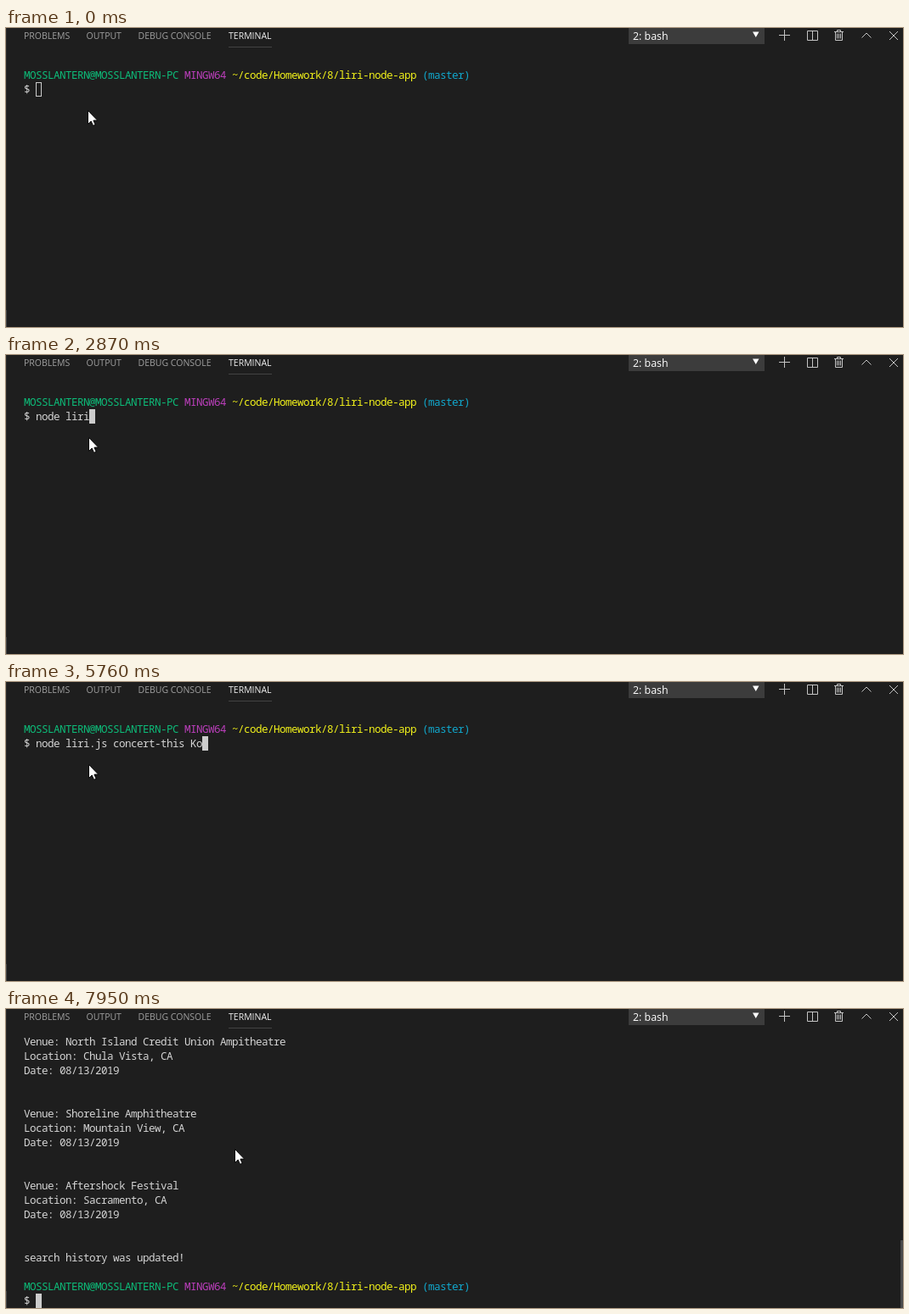
An HTML page for the animation above (8000 ms loop, 1056 px wide and 353 px high).

```html
<!DOCTYPE html>
<html lang="en">
<head>
<meta charset="utf-8">
<title>Terminal</title>
<style>
  html, body { margin: 0; width: 100%; height: 100%; overflow: hidden; background: #1e1e1e; }
  svg { position: absolute; left: 0; top: 0; display: block; }
  .ui { font-family: "Open Sans", "Noto Sans", sans-serif; }
  .tab { font-size: 10.5px; fill: #a0a0a0; }
  .active { fill: #f0f0f0; }
  #shell { font-size: 12.4px; fill: #fff; }
  .icons { fill: none; stroke: #c5c5c5; }
  pre {
    position: absolute; left: 21px; top: 30px; margin: 0;
    font: 500 12.6px/17px "Noto Sans Mono", monospace; color: #d4d4d4;
  }
  .host { color: #0dbc79; }
  .system { color: #bc3fbc; }
  .path { color: #f2f21a; }
  .branch { color: #11a8cd; }
</style>
</head>
<body>
<svg width="1056" height="353" viewBox="0 0 1056 353">
  <path d="M0 0h1v333h-1z" fill="#2a2a2a"/>
  <path d="M0 333h1v20h-1z" fill="#484848"/>
  <g class="ui tab">
    <text x="21" y="13">PROBLEMS</text>
    <text x="94.5" y="13">OUTPUT</text>
    <text x="155.5" y="13">DEBUG CONSOLE</text>
    <text x="262" y="13" class="active">TERMINAL</text>
  </g>
  <path d="M262 22h51v1h-51z" fill="#434343"/>
  <path d="M733 0h160v19h-160z" fill="#3c3c3c"/>
  <text id="shell" class="ui" x="738" y="14">2: bash</text>
  <path d="M879 4.5h7.5l-3.75 6.5z" fill="#fff"/>
  <g class="icons">
    <path d="M910 8.5h13M916.5 2v13"/>
    <path d="M943.5 3.5h12v11h-12zM949.5 3.5v11"/>
    <path d="M975 4.5h11M978.5 4v-1.5h4V4M976.5 5v9.5h8V5M978.5 6.5v6M980.5 6.5v6M982.5 6.5v6"/>
    <path d="M1007.5 11.5l5.5-5.5 5.5 5.5"/>
    <path d="M1040 4l10 10M1050 4l-10 10"/>
  </g>
  <path id="scrollbar" d="M1053 273h3v80h-3z" fill="#4a4a4a"/>
</svg>
<pre id="screen"></pre>
<svg width="1056" height="353" viewBox="0 0 1056 353">
  <rect id="caret" width="6" height="16" stroke="#ccc"/>
  <path id="pointer" d="M.5.5V16.5L4.2 13 6.6 18.3 9.1 17.2 6.9 12.1H11.6Z" fill="#fff" stroke="#000" stroke-width=".9"/>
</svg>
<script>
const LOOP = 8000;
const CELL = { width: 7, height: 17, left: 21, top: 30 };
const COMMAND = "node liri.js concert-this Korn";
const KEY_TIMES = [
  1300, 1380, 1530, 1690, 1850, 1930, 2090, 2170, 2870, 3100,
  3330, 3640, 3950, 4110, 4190, 4270, 4420, 4580, 4660, 4820,
  4890, 5050, 5130, 5210, 5290, 5440, 5600, 5760, 5920, 6080
];
const ENTER = 6540, NODE_START = 6620, OUTPUT = 7240, NODE_END = 7320;
const FOCUS = 450;

// time, x, y
const POINTER = [
  [0, 96, 97], [370, 97, 97],
  [7710, 122, 105], [7790, 186, 129], [7870, 246, 156], [7950, 269, 165]
];

const span = (name, text) => `<span class="${name}">${text}</span>`;
const PROMPT = [
  span("host", "MOSSLANTERN@MOSSLANTERN-PC"),
  span("system", "MINGW64"),
  span("path", "~/code/Homework/8/liri-node-app"),
  span("branch", "(master)")
].join(" ");

const concert = (venue, city) =>
  [`Venue: ${venue}`, `Location: ${city}, CA`, "Date: 08/13/2019", "", ""];
const RESULTS = [
  ...concert("North Island Credit Union Ampitheatre", "Chula Vista"),
  ...concert("Shoreline Amphitheatre", "Mountain View"),
  ...concert("Aftershock Festival", "Sacramento"),
  "search history was updated!", "", PROMPT, "$ "
].join("\n");

const [shell, scrollbar, screen, caret, pointer] =
  ["shell", "scrollbar", "screen", "caret", "pointer"].map(id => document.getElementById(id));

// Tighten the glyph advance to the terminal's whole-pixel cell.
function fitCells() {
  const sample = "0".repeat(50);
  screen.textContent = sample;
  const advance = screen.getBoundingClientRect().width / sample.length;
  screen.style.letterSpacing = `${CELL.width - advance}px`;
}

function setText(html) {
  if (screen.dataset.html === html) return;
  screen.dataset.html = html;
  screen.innerHTML = html;
}

function placeCaret(column, row, solid) {
  caret.setAttribute("x", CELL.left + CELL.width * column + 0.5);
  caret.setAttribute("y", CELL.top + CELL.height * row + 0.5);
  caret.setAttribute("fill", solid ? "#ccc" : "none");
}

function render(t) {
  const typed = KEY_TIMES.filter(time => time <= t).length;
  const done = t >= OUTPUT;
  setText(done ? RESULTS : `\n${PROMPT}\n$ ${COMMAND.slice(0, typed)}`);

  if (done) placeCaret(2, 18, true);
  else if (t >= ENTER) placeCaret(0, 3, true);
  else placeCaret(2 + typed, 2, t >= FOCUS);

  shell.textContent = t >= NODE_START && t < NODE_END ? "2: node" : "2: bash";
  scrollbar.style.visibility = done ? "visible" : "hidden";

  const [, x, y] = POINTER.filter(([time]) => time <= t).pop();
  pointer.setAttribute("transform", `translate(${x} ${y})`);
}

function tick() {
  render(performance.now() % LOOP);
  requestAnimationFrame(tick);
}
fitCells();
tick();
</script>
</body>
</html>
```
